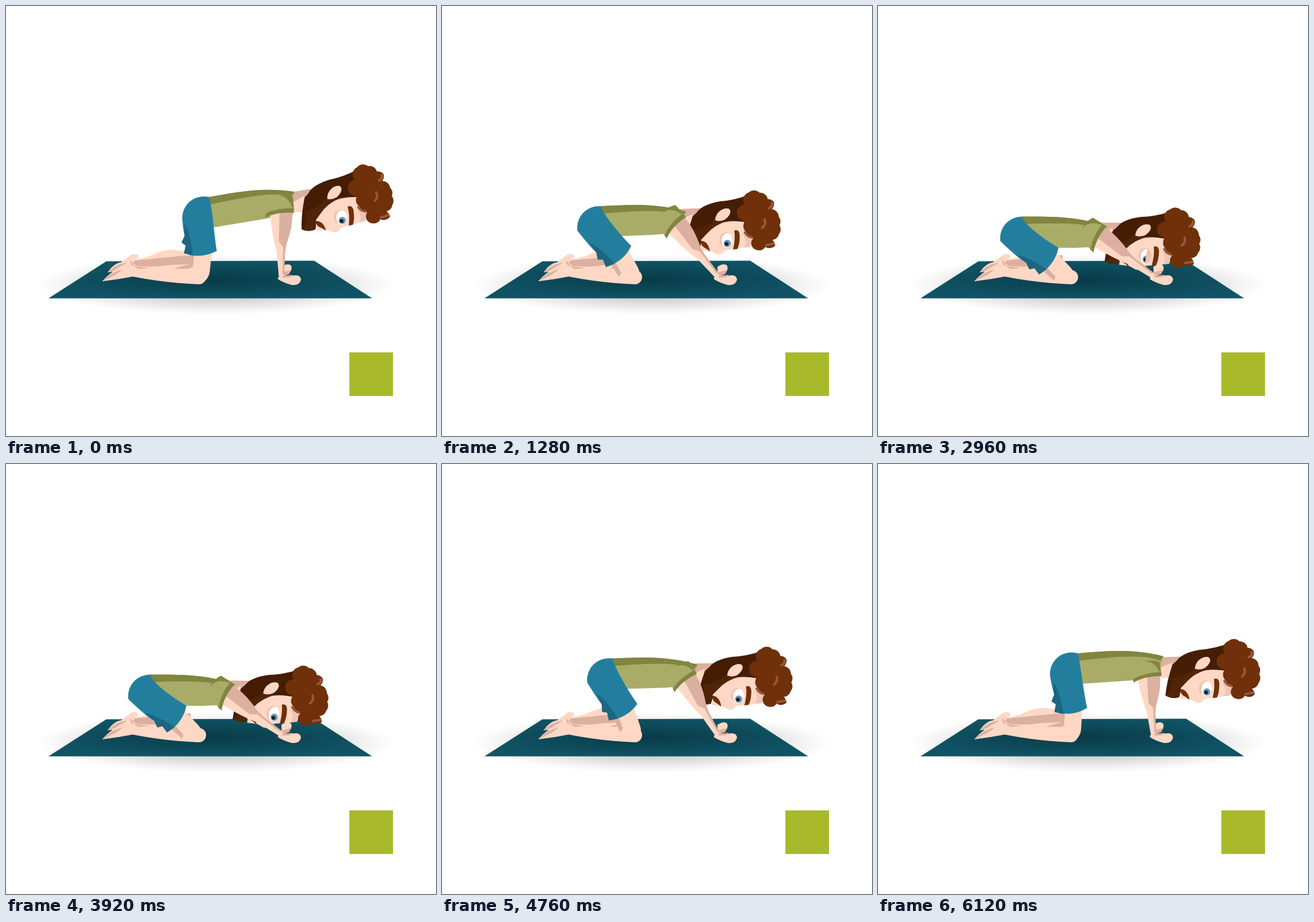
An HTML page for the animation above (6800 ms loop, 720 px wide and 720 px high).

```html
<!DOCTYPE html>
<html lang="en">
<head>
<meta charset="utf-8">
<title>Yoga stretch</title>
<style>
  html, body { margin: 0; width: 100%; height: 100%; overflow: hidden; background: #fff; }
  svg { display: block; width: 100vw; height: 100vh; }
  .skin { fill: #ffd8c5; }
  .shade { fill: #dcb0a0; }
  .shirt { fill: #a9ac67; }
  .fold { fill: #81853f; }
  .beard { fill: #451c04; }
  .hair { fill: #6f300a; }
  .curl { fill: none; stroke: #95583a; stroke-width: 4; stroke-linecap: round; }
</style>
</head>
<body>
<svg viewBox="0 0 720 720">
  <defs>
    <radialGradient id="shadow">
      <stop offset="0" stop-opacity=".38"/>
      <stop offset=".5" stop-opacity=".17"/>
      <stop offset=".85" stop-opacity=".045"/>
      <stop offset="1" stop-opacity="0"/>
    </radialGradient>
    <radialGradient id="matFill">
      <stop offset="0" stop-color="#093b48"/>
      <stop offset="1" stop-color="#105364"/>
    </radialGradient>
    <clipPath id="eyeClip"><ellipse cx="562" cy="354" rx="9" ry="12"/></clipPath>
  </defs>

  <ellipse cx="352" cy="467" rx="300" ry="50" fill="url(#shadow)"/>
  <path d="M168 427.5L516 426.5L613 489.5H71Z" fill="url(#matFill)"/>
  <rect x="575" y="580" width="73" height="73" fill="#a8ba2b"/>

  <!-- lower legs -->
  <path class="skin" d="M170 446Q180 431 193 429L210 416Q221 413 222 421L216 425L240 419Q258 409 278 408L300 411L310 440L215 440Z"/>
  <path class="shade" d="M170 446Q182 434 196 431L205 428L190 440ZM216 426L309 417L310 440L222 438L212 430Z"/>
  <path class="skin" d="M161 461Q176 444 199 432L209 421L213 434Q240 439 270 434L308 432L323 442A12 12 0 0 1 323 466Q262 463 212 453L190 457Z"/>
  <path class="shade" d="M161 461Q178 444 196 441L182 451ZM208 424L214 435L240 439L222 440L209 433ZM280 440L308 432L311 440Z"/>

  <g id="thigh">
    <path class="skin" d="M307 410H345L341 445Q339 461 322 466L306 440Z"/>
    <path class="shade" d="M307 410H316L313 437L306 440Z"/>
  </g>

  <g id="head">
    <path class="shade" d="M476 312L512 306L505 344L484 345Z"/>
    <path class="skin" d="M480 329L499 318L500 344L484 345L481 340Z"/>
    <path class="skin" d="M520 350L545 320L590 318L606 345L602 360L577 367Q566 369 560 372Q557 380 548 379L537 375L520 376Z"/>
    <path class="shade" d="M585 340L604 345L602 360L592 362Q597 350 585 340Z" opacity=".45"/>
    <path class="beard" d="M506 314Q513 300 541 291Q566 286 590 273L600 320Q560 318 547 328Q533 336 519 358Q520 367 518 374Q506 379 495 374Q494 350 500 321Z"/>
    <path d="M500 343Q520 343 537 321L562 320Q545 325 533 339L519 358L518 374Q506 379 496 374Q508 360 500 343Z" fill="#512407"/>
    <path class="hair" d="M518 360Q531 359 536 376L529 372Q519 369 518 360Z"/>
    <path class="skin" d="M538 323C537 310 548 300 558 301C565 304 561 314 554 320Q546 325 538 323Z"/>
    <ellipse class="shade" cx="560" cy="353" rx="11" ry="12" opacity=".5"/>
    <g clip-path="url(#eyeClip)">
      <rect x="550" y="340" width="26" height="28" fill="#fff"/>
      <circle cx="563" cy="359" r="6" fill="#6b9ab5"/>
      <circle cx="562" cy="360" r="3.2" fill="#14222e"/>
      <rect id="lid" x="573" y="340" width="26" height="28" fill="#ecc1ae"/>
    </g>
    <path class="hair" d="M572 336Q580 332 582 343Q584 357 581 366L574 368Q576 350 572 336Z"/>
    <path id="curls" class="hair"/>
    <path class="curl" d="M629 283Q631 289 625 292M620 312Q624 319 618 326M590 337Q594 343 602 344M628 354L640 350"/>
  </g>

  <g id="torso">
    <path class="shirt" d="M340 320C390 311 430 303 483 311Q478 325 481 346L436 356L352 370L330 372V330Z"/>
    <path class="fold" d="M338 320C390 311 430 303 483 311L478 319C450 310 400 320 338 333Z"/>
  </g>

  <path id="shorts" fill="#237e9d"/>
  <path id="shortsShade" fill="#1c667f"/>

  <path class="skin" d="M461 437C470 430 480 431 478 441C476 446 468 449 462 452Z"/>
  <path class="shade" d="M462 446L478 442L474 449L462 453Z"/>
  <g id="arm">
    <path class="skin" d="M-16-6C-14 25-10 45-6 62L-3 105L6 103C6 80 8 62 11 48C18 30 21 15 22-6Z"/>
    <path class="shade" d="M0-5H22C21 15 18 30 11 48L8 62L6 103L3 98L5 54L-2 44Z"/>
    <path class="shirt" d="M-24 1L-17-24Q0-36 23-28L25-5L0-5Z"/>
    <path class="fold" d="M-24 4L-23-3Q-4-12 24-11V-3Q-4-6-24 4ZM-3-33Q16-32 21-12L24-12L23-29Q12-35-3-33Z"/>
  </g>
  <path class="skin" d="M455 455L463 451L476 452C486 450 493 450 494 458C492 466 486 468 478 467C470 465 463 462 456 458Z"/>
  <path class="shade" d="M462 452L480 450L476 454L464 455Z"/>
</svg>

<script>
const $ = id => document.getElementById(id);
const LOOP = 6800, STEP = 40;
const LOWER_TIME = 1800, RISE_START = 3920, RISE_TIME = 1640;
const KNEE = [322, 462], WRIST = [460, 453], THIGH = 117;

// Offsets are from the hip (waist) or from the waist (head, sleeve, seat).
const start = { thigh: 0, waist: [18, -25], torso: 0, head: [209, -8], tilt: 0, sleeve: [118, 30], seat: [-10, 34] };
const low = { thigh: -50, waist: [9, -34], torso: 10, head: [202, 22.5], tilt: 10, sleeve: [130, 38], seat: [-2, 35] };
const end = { thigh: -3, waist: [19, -28], torso: 5.5, head: [208, 16], tilt: 7.5, sleeve: [116, 43], seat: [-12, 34] };

const clamp = v => Math.min(1, Math.max(0, v));
const mix = (a, b, p) => Array.isArray(a) ? a.map((v, i) => mix(v, b[i], p)) : a + (b - a) * p;
const add = (a, b) => [a[0] + b[0], a[1] + b[1]];
const place = (id, transform) => $(id).setAttribute('transform', transform);

const rim = [[588, 270], [606, 268], [621, 277], [632, 281], [630, 293], [643, 304], [646, 318], [647, 333],
  [637, 344], [643, 353], [627, 357], [614, 364], [604, 358], [605, 345], [592, 336], [588, 318], [584, 291]];
$('curls').setAttribute('d', 'M584 291' + rim.map(p => `A13 13 0 0 1 ${p}`).join('') + 'Z');

function poseAt(t) {
  const rising = t >= RISE_START;
  const [from, to] = rising ? [low, end] : [start, low];
  const p = clamp(rising ? (t - RISE_START) / RISE_TIME : t / LOWER_TIME);
  return Object.fromEntries(Object.keys(from).map(k => [k, mix(from[k], to[k], p)]));
}

function drawShorts(angle, waist, seat) {
  const c = Math.cos(angle), s = Math.sin(angle);
  const turn = (x, y) => {
    const dx = x - KNEE[0], dy = y - KNEE[1];
    return add(KNEE, [dx * c - dy * s, dx * s + dy * c]);
  };
  const back = add(add(waist, seat), [-34.5, 6]);
  $('shorts').setAttribute('d', `M${waist}A36 36 0 0 0 ${back}Q${turn(296, 372)} ${turn(299, 385)}` +
    `L${turn(294, 396)} ${turn(301, 401)} ${turn(298, 414)}Q${turn(327, 424)} ${turn(353, 410)}` +
    `C${turn(348, 380)} ${turn(346, 340)} ${waist}Z`);
  $('shortsShade').setAttribute('d', `M${turn(299, 364)}Q${turn(309, 382)} ${turn(313, 418)}` +
    `L${turn(298, 414)} ${turn(301, 401)} ${turn(294, 396)} ${turn(299, 385)}Z`);
}

function draw(t) {
  const pose = poseAt(t);
  const angle = pose.thigh * Math.PI / 180;
  const hip = add(KNEE, [THIGH * Math.sin(angle), -THIGH * Math.cos(angle)]);
  const waist = add(hip, pose.waist);
  const sleeve = add(waist, pose.sleeve);
  const dx = WRIST[0] - sleeve[0], dy = WRIST[1] - sleeve[1];

  place('thigh', `rotate(${pose.thigh} ${KNEE})`);
  place('torso', `translate(${waist}) rotate(${pose.torso}) translate(-340 -320)`);
  place('head', `translate(${add(waist, pose.head)}) rotate(${pose.tilt}) translate(-549 -312)`);
  place('arm', `translate(${sleeve}) rotate(${-Math.atan2(dx, dy) * 180 / Math.PI}) scale(1 ${Math.hypot(dx, dy) / 103})`);
  drawShorts(angle, waist, pose.seat);

  const blink = Math.max(...[3040, 5960].map(c => clamp(1 - Math.abs(t - c) / 160)));
  place('lid', `translate(${-22 * blink} 0)`);
}

function tick() {
  draw(Math.floor(performance.now() % LOOP / STEP) * STEP);
  requestAnimationFrame(tick);
}
tick();
</script>
</body>
</html>
```
